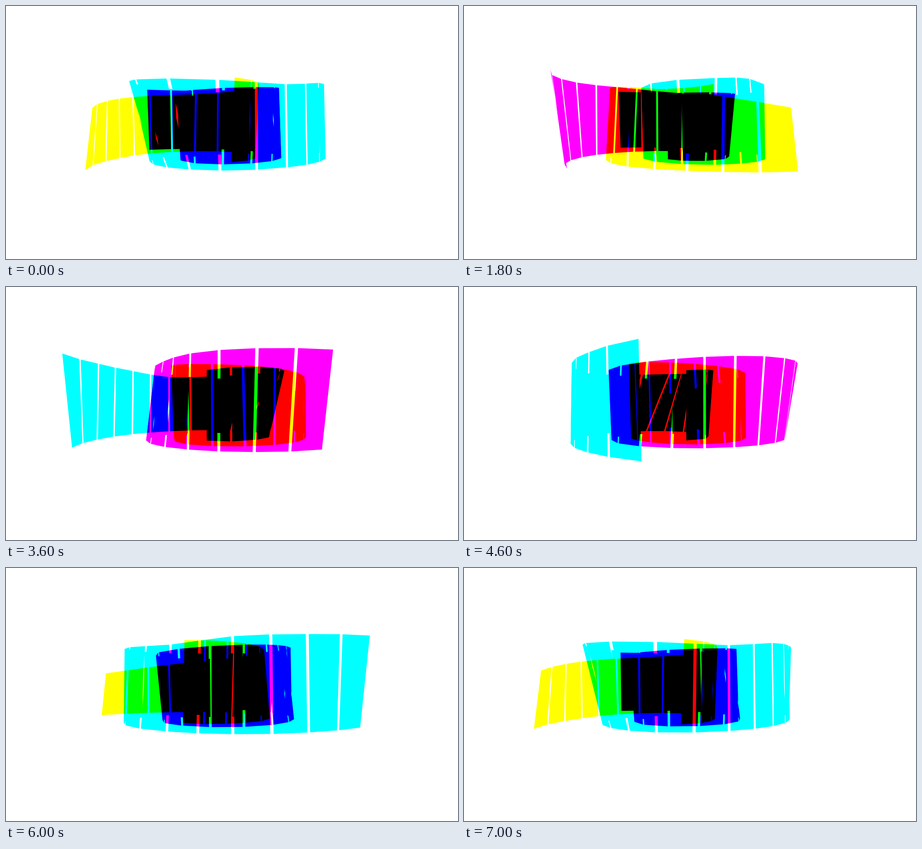
An HTML page with a canvas that plays this animation: 999 by 560 pixels, repeating every 7200 ms.

```html
<!DOCTYPE html>
<html lang="en">
<head>
<meta charset="utf-8">
<title>Turning ribbons</title>
<style>
  html, body { margin: 0; width: 100%; height: 100%; overflow: hidden; background: #fff; }
  canvas { display: block; }
</style>
</head>
<body>
<canvas id="stage" width="999" height="560"></canvas>
<script>
// Three spiral ribbons of flat panels turn about a vertical axis.
// Key ribs: angle, bottom radius, lean of the top, top radius, top height.
const ribbons = [
  { color: '#0ff', panels: 16, keys: [
    [-200, 53, 0, 53, 62], [-112, 93, -4, 102, 69], [-60, 152, -6, 183, 71],
    [-27, 186, -20, 200, 72], [2, 203, -1, 193, 65], [37, 207, 1, 201, 61],
    [67, 222, 0, 220, 71], [97, 253, 0, 250, 77], [121.5, 297, 0, 313, 81]] },
  { color: '#f0f', panels: 15, keys: [
    [-105, 45, 0, 50, 52], [-20, 116, 0, 130, 54], [56, 136, 0, 142, 63],
    [129, 161, 3, 137, 75], [181.5, 201, 0, 213, 80], [225, 255, -2, 280, 82]] },
  { color: '#ff0', panels: 14, keys: [
    [18.5, 98, 3.5, 100, 81], [95, 90, 0, 97, 75], [168, 131, -1, 115, 68],
    [231, 168, 1, 169, 59], [279, 211, 1, 211, 42], [313, 292, 0, 280, 18.5]] }
];

const LOOP = 7200, STEP = 200, TURN = 10;
const CENTER_X = 463, CENTER_Y = 250, DISTANCE = 772, BASE = 84.2, GAP = 0.043;
const ctx = document.getElementById('stage').getContext('2d');

const mix = (p, q, k) => p.map((v, i) => v + (q[i] - v) * k);

// Catmull-Rom curve through the keys, continued straight past both ends.
function ribAt(keys, u) {
  const last = keys.length - 1;
  const i = Math.min(Math.floor(u), last - 1);
  const t = u - i;
  const b = keys[i], c = keys[i + 1];
  const a = keys[i - 1] || mix(c, b, 2);
  const d = keys[i + 2] || mix(b, c, 2);
  return b.map((v, n) => v + t / 2 * (c[n] - a[n]
    + t * (2 * a[n] - 5 * v + 4 * c[n] - d[n]
    + t * (3 * (v - c[n]) + d[n] - a[n]))));
}

function place(angle, radius, height) {
  const a = angle * Math.PI / 180;
  return [radius * Math.sin(a), height, radius * Math.cos(a)];
}

function project([x, y, z]) {
  const scale = DISTANCE / (DISTANCE - z);
  return [CENTER_X + x * scale, CENTER_Y + y * scale];
}

function drawRibbon({ color, panels, keys }, turn) {
  const ribs = Array.from({ length: panels + 1 }, (_, i) => {
    const [angle, radius, lean, topRadius, height] = ribAt(keys, i / panels * (keys.length - 1));
    return {
      bottom: place(angle + turn, radius, BASE),
      top: place(angle + lean + turn, topRadius, -height)
    };
  });
  ctx.fillStyle = color;
  for (let i = 0; i < panels; i++) {
    const { top, bottom } = ribs[i], next = ribs[i + 1];
    const from = i ? GAP : 0;
    const to = i + 1 < panels ? 1 - GAP : 1;
    ctx.beginPath();
    for (const corner of [
      mix(top, next.top, from), mix(top, next.top, to),
      mix(bottom, next.bottom, to), mix(bottom, next.bottom, from)
    ]) ctx.lineTo(...project(corner));
    ctx.fill();
  }
}

function draw() {
  const turn = Math.floor(performance.now() % LOOP / STEP) * TURN;
  ctx.globalCompositeOperation = 'source-over';
  ctx.fillStyle = '#fff';
  ctx.fillRect(0, 0, 999, 560);
  ctx.globalCompositeOperation = 'multiply';
  for (const ribbon of ribbons) drawRibbon(ribbon, turn);
  requestAnimationFrame(draw);
}
draw();
</script>
</body>
</html>
```
